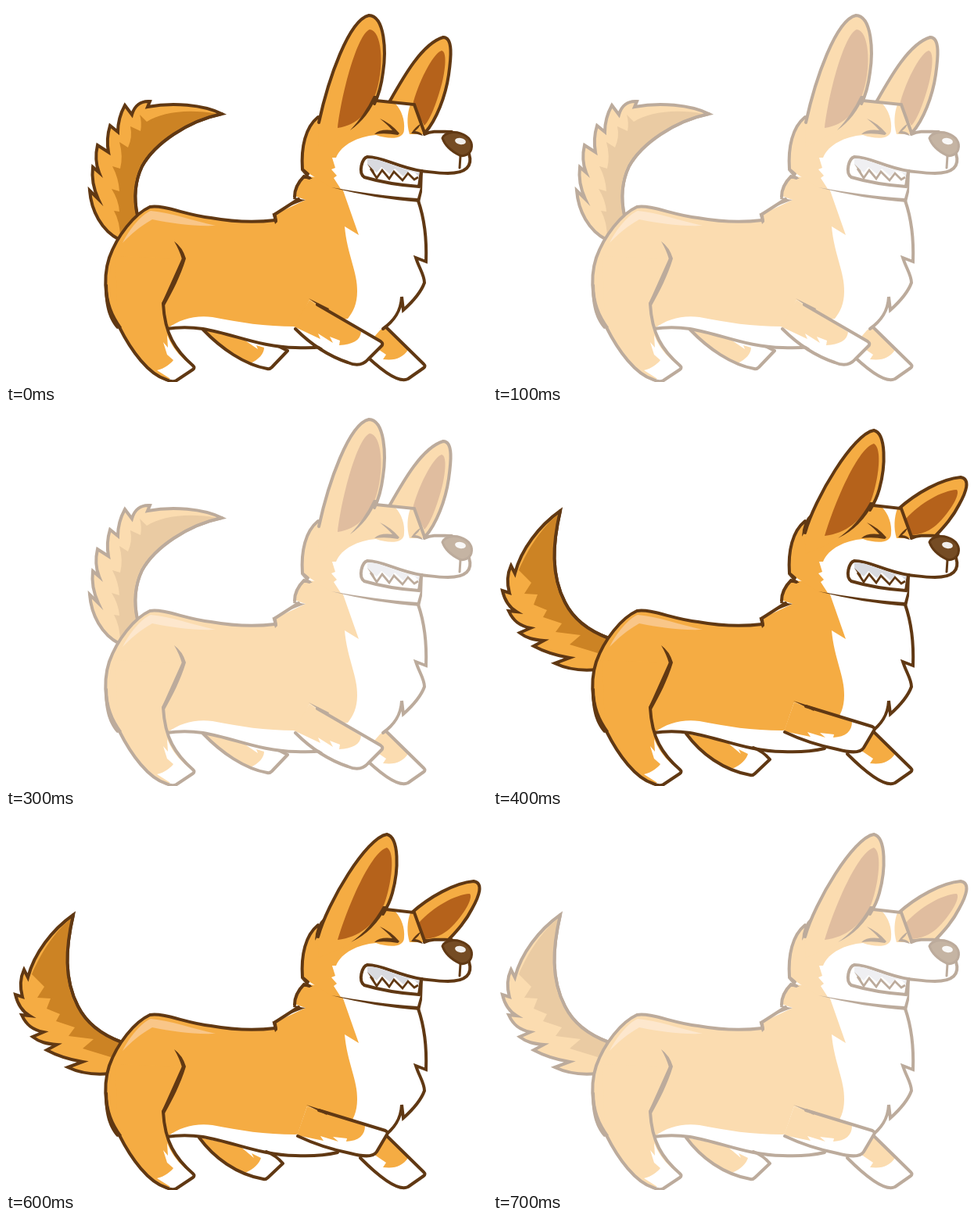
Recreate the animation shown at these times as an HTML page. Size 615x481 px, loop 800 ms.

```html
<!DOCTYPE html>
<html lang="en">
<head>
<meta charset="utf-8">
<title>Running corgi</title>
<style>
html, body { margin: 0; width: 100%; height: 100%; overflow: hidden; background: #fff; }
svg { display: block; width: 615px; height: 481px; }
path { fill: none; }
.line { stroke: #603813; stroke-width: 4; stroke-linejoin: miter; stroke-miterlimit: 6; stroke-linecap: round; }
.round { stroke-linejoin: round; }
.coat { fill: #f5ac43; }
.white { fill: #fff; }
.shade { fill: #cc8324; }
.ear { fill: #b5621b; }
.ink { fill: #603813; }
.glow { fill: #f9c688; }
.nose { fill: #754c24; }
.grey { fill: #d9dadf; }
.b { opacity: 0; }
</style>
</head>
<body>
<svg id="dog" viewBox="0 0 615 481">
  <!-- tail -->
  <g class="a">
    <path class="coat line" d="M168 268C163 245 165 224 174 205C190 176 232 147 276 138C252 126 213 123 181 129L184 122C172 121 164 128 161 139L152 127C146 138 143 149 143 161L133 153C129 166 129 176 131 187L117 178C114 191 115 203 119 213L111 206C109 222 112 234 118 247L107 236C109 262 122 287 145 299"/>
    <path class="shade" d="M270 138C232 131 199 136 180 148L171 139Q174 149 172 160L159 154Q162 168 156 181L145 174Q150 192 146 208L136 205Q144 220 145 237L135 234Q144 248 145 263L138 262Q146 276 146 297L166 267C161 244 163 223 172 204C188 175 231 146 270 138Z"/>
    <path class="line" d="M168 268C163 245 165 224 174 205C190 176 232 147 276 138"/>
  </g>
  <g class="b">
    <path class="coat line" d="M148 292C121 282 102 266 92 246C74 211 76 172 86 129C59 148 36 178 28 209L23 199C18 210 18 223 21 234L12 231C15 244 20 252 30 258L20 257C26 270 34 276 48 279L34 285C43 292 52 294 65 295L52 302C65 309 80 314 98 317L79 324C96 332 114 334 133 332"/>
    <path class="shade" d="M84 133C62 150 44 179 33 205L49 221L40 235L57 236L52 249L69 256L64 265L88 273L80 284L112 288L98 300L134 311L148 293C120 283 100 265 90 246C72 211 75 172 84 133Z"/>
    <path class="line" d="M148 292C121 282 102 266 92 246C74 211 76 172 86 129"/>
  </g>

  <!-- far hind leg -->
  <g class="a">
    <path class="white" d="M252 414C275 438 305 459 336 464L360 441L328 428Z"/>
    <path class="coat" d="M252 414C270 433 292 449 313 457C323 452 330 445 330 437L320 434L322 439L300 424Z"/>
    <path class="line round" d="M252 414C275 438 305 459 334 464Q337 465 340 462L360 441L350 436"/>
  </g>
  <g class="b">
    <path class="white" d="M247 414C266 440 295 461 331 467L355 446L328 428Z"/>
    <path class="coat" d="M247 414C263 437 285 452 306 459C317 454 324 447 326 440L314 434L317 440L298 424Z"/>
    <path class="line round" d="M247 414C266 440 295 461 329 467Q332 468 335 465L354 447C348 440 341 435 333 432"/>
  </g>

  <!-- far front leg -->
  <path class="white" d="M484 408L535 460L513 478C494 482 470 459 450 438Z"/>
  <path class="coat" d="M484 408L514 440C507 450 498 454 482 452L486 446L464 431Z"/>
  <path class="line round" d="M484 409L534 458Q537 461 534 463L514 477C502 483 478 465 453 440"/>

  <!-- body -->
  <path class="white" d="M184 257L343 275L380 209L528 248C535 272 538 300 537 327L524 322L536 354L509 388L505 373C505 391 496 403 482 413L424 433C350 447 300 412 250 412L205 413Z"/>
  <path class="coat" d="M184 257C205 254 231 268 262 271C290 276 320 276 344 274L343 267L383 248L369 243C369 235 373 226 381 218L420 220L431 236L451 293L433 282C436 317 450 342 449 365C449 381 444 391 437 400L370 410C330 410 300 405 264 398C242 395 222 401 207 412L143 412C125 385 122 350 132 322C142 294 164 267 184 257Z"/>
  <path class="line" d="M205 413C224 410 239 411 252 413C292 420 328 437 370 437C390 438 407 437 424 433"/>
  <path class="line" d="M527 249C535 272 538 300 537 327L524 322C528 335 535 344 535 354C530 368 518 380 508 389L506 372C505 391 496 403 482 413"/>
  <path class="glow" d="M149 303C158 285 173 267 185 262C210 264 240 275 268 281C237 282 213 278 187 273C171 282 160 292 149 303Z"/>

  <!-- near hind leg -->
  <path class="coat" d="M143 409C160 440 184 472 207 478L241 463C220 445 203 425 201 381L226 323L140 320Z"/>
  <path class="white" d="M201 430L207 437L206 421C214 440 225 451 241 463L215 480L193 466C203 464 211 457 214 453L206 446Z"/>
  <path class="line round" d="M145 411C160 441 182 471 205 478Q213 482 218 479L239 465Q242 463 239 460C216 440 203 419 201 381L227 323"/>
  <path class="ink" d="M199 380C209 362 219 342 225 324Q222 313 215 301Q226 309 230 323C223 346 213 365 203 383Z"/>
  <path class="ink" d="M126 358C126 386 132 402 142 413L148 411C137 395 130 380 130 356Z"/>
  <path class="line" d="M145 411C127 392 123 349 132 322C142 294 164 266 184 257C203 254 231 268 262 271C290 276 320 277 344 274"/>
  <path class="ink" d="M340 266Q364 255 383 248Q374 247 368 244L367 247L375 248Q357 259 341 266L344 279L347 276L346 268Z"/>
  <path class="line" d="M374 247L343 267L345 275M369 244C369 235 373 226 381 218L388 220"/>

  <!-- near front leg -->
  <g class="a">
    <path class="white" d="M388 376L481 431L463 452C451 466 405 443 370 412Z"/>
    <path class="coat" d="M388 376L454 417C453 428 443 433 426 434L427 428L414 423L418 431L399 419L402 426L368 410Z"/>
    <path class="line round" d="M398 382L479 429Q483 432 480 435L463 452C455 461 446 460 437 456C413 448 390 433 370 413"/>
    <path class="ink" d="M387 374L413 387L411 391Z"/>
  </g>
  <g class="b">
    <path class="white" d="M385 374L488 407L474 432C464 444 405 428 372 412Z"/>
    <path class="coat" d="M385 374L459 399C459 411 451 418 435 419L436 415L418 413L425 419L402 412L406 418L372 411Z"/>
    <path class="line round" d="M400 379L485 405Q489 407 487 410L474 432C469 440 455 438 440 434C415 429 392 421 373 412"/>
    <path class="ink" d="M384 372L412 381L410 385Z"/>
  </g>

  <!-- far ear -->
  <g class="a">
    <path class="coat line" d="M490 123C508 91 532 48 559 40C572 40 569 67 566 88C562 116 550 146 536 162"/>
    <path class="ear" d="M520 126C526 101 545 61 557 57C565 59 561 86 556 104C550 125 543 144 535 153Z"/>
  </g>
  <g class="b">
    <path class="coat line" d="M518 127C541 106 574 88 598 86C611 88 605 105 596 121C587 139 574 152 563 164L536 162"/>
    <path class="ear" d="M528 139C546 119 574 103 593 102C598 107 585 130 567 147C559 154 549 159 535 160Z"/>
  </g>

  <!-- head -->
  <path class="coat" d="M417 233L379 209C376 180 384 154 399 142L474 121L522 126L537 163L520 240Z"/>
  <path class="white" d="M497 124L517 126C513 137 512 151 516 164L535 164C545 159 557 161 570 161L594 190C598 205 587 214 565 214L530 212L528 249C490 246 455 240 428 234L419 220L423 217L416 209L421 207L417 194L422 194C429 177 450 167 473 165C490 171 509 171 509 158C510 146 506 133 497 124Z"/>
  <path class="line" d="M379 209C377 180 383 155 399 142M379 209L386 215"/>
  <path class="ink" d="M377 210L392 221L380 221L383 217Z"/>
  <path class="a line" d="M473 121L522 126L535 162"/>
  <path class="b line" d="M486 122L522 126L535 162"/>
  <path class="line" d="M535 164C545 159 557 161 570 161M592 189C597 205 588 214 565 214C552 214 541 212 530 211"/>
  <path class="ink" d="M416 232C450 238 490 244 526 246L530 232L529 211L533 211L532 238L529 251C492 248 455 242 416 232Z"/>

  <!-- mouth -->
  <path class="white line" d="M462 193C482 193 500 206 531 211L528 231C500 229 475 224 458 219C450 213 455 195 462 193Z"/>
  <path class="grey" d="M462 195C482 195 500 208 528 213L528 219L523 213L515 211L508 218L497 208L491 215L480 206L474 213L462 203Z"/>
  <path d="M466 208L474 220L481 210L490 221L496 212L507 223L514 214L522 222L527 219" stroke="#603813" stroke-width="2.8"/>
  <path class="ink" d="M462 202L470 210L474 221Z"/>

  <!-- nose -->
  <path class="nose line" d="M558 169C561 162 572 160 581 163C593 167 597 175 595 183C593 190 585 193 580 191C570 186 561 178 558 169Z" style="stroke-width:3"/>
  <ellipse cx="581" cy="173" rx="7" ry="4" fill="#f1eeeb" transform="rotate(10 581 173)"/>
  <path class="line" d="M581 192L580 207" style="stroke-width:3"/>

  <!-- eyes -->
  <path class="ink" d="M478 144Q492 150 503 163L501 165Q486 162 471 164Q478 157 494 159Q488 152 478 144Z"/>
  <path class="ink" d="M531 150Q523 155 518 163Q525 163 533 166Q531 161 523 160Q528 156 531 150Z"/>

  <!-- near ear -->
  <g class="a">
    <path class="coat" d="M399 150C412 94 438 18 464 12C485 13 486 59 482 85C478 112 465 143 440 160L400 180Z"/>
    <path class="ear" d="M424 156C429 112 449 36 465 30C481 32 483 75 475 104C468 133 449 153 424 156Z"/>
    <path class="line" d="M400 149C412 94 438 18 464 12C485 13 486 59 482 85C480 101 476 115 471 125"/>
    <path class="ink" d="M474 115Q464 142 440 159Q458 140 470 115Z"/>
  </g>
  <g class="b">
    <path class="coat" d="M398 160C411 113 461 30 487 26C503 30 502 72 494 101C487 127 468 153 443 165L400 184Z"/>
    <path class="ear" d="M424 161C437 117 467 48 487 43C498 49 493 88 484 114C473 141 451 158 424 161Z"/>
    <path class="line" d="M399 157C411 113 461 30 487 26C503 30 502 72 494 101C491 112 487 120 482 128"/>
    <path class="ink" d="M407 132Q396 142 395 162L402 151Z"/>
    <path class="ink" d="M487 118Q471 150 441 164Q466 147 482 118Z"/>
  </g>
</svg>
<script>
const LOOP = 800, FADED = 0.42;

// Holds `first` for half the period, then jumps to `second`.
function flip(el, first, second, duration) {
  el.animate([
    { opacity: first, offset: 0 },
    { opacity: first, offset: 0.5 },
    { opacity: second, offset: 0.5 },
    { opacity: second, offset: 1 }
  ], { duration, iterations: Infinity });
}

flip(document.getElementById("dog"), 1, FADED, LOOP / 4);
document.querySelectorAll(".a").forEach(el => flip(el, 1, 0, LOOP));
document.querySelectorAll(".b").forEach(el => flip(el, 0, 1, LOOP));
</script>
</body>
</html>
```
